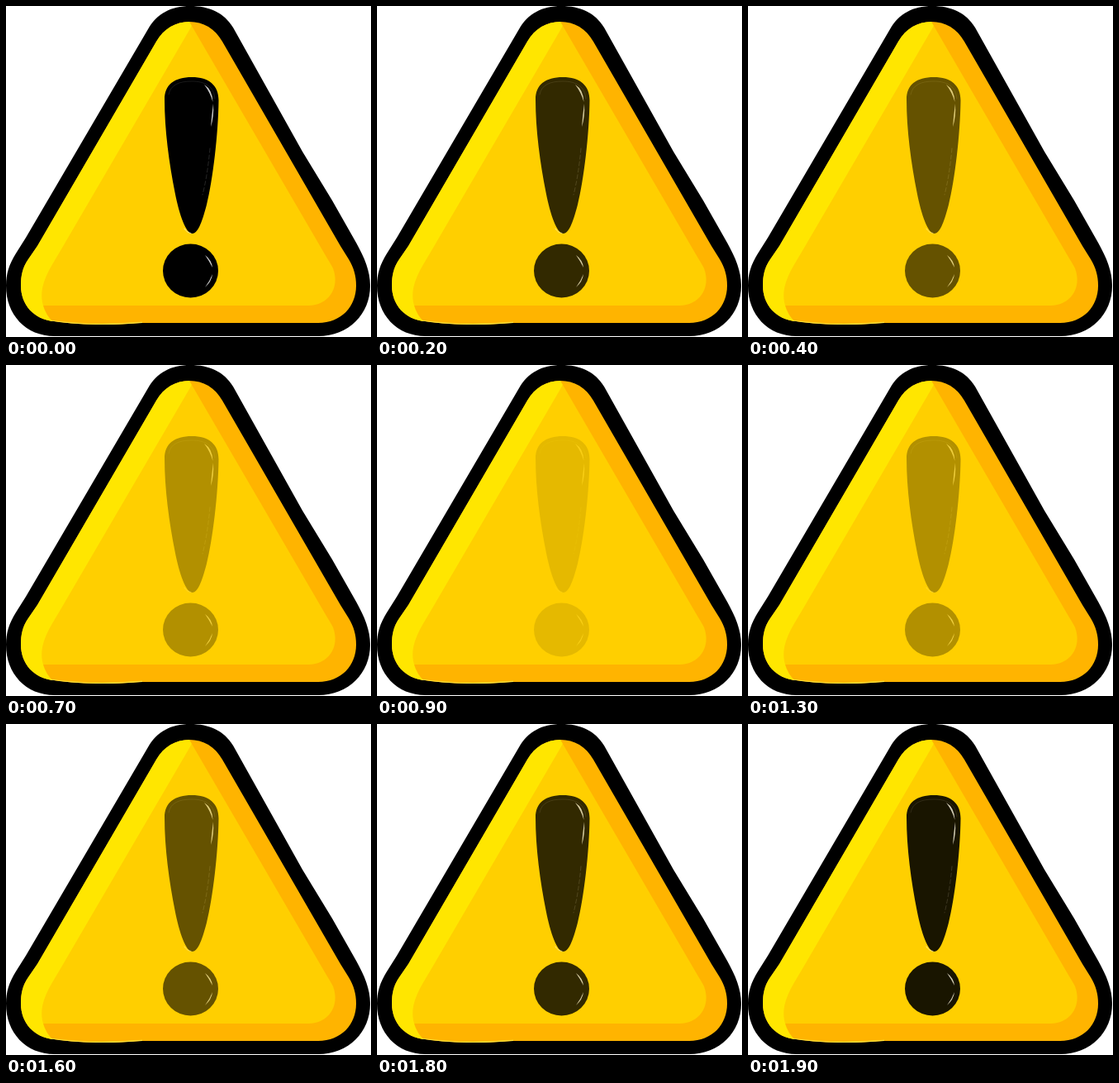
An HTML page without scripts for the animation above (2 s loop, 442 px wide and 400 px high).

```html
<!DOCTYPE html>
<html lang="en">
<head>
<meta charset="utf-8">
<title>Warning sign</title>
<style>
  html, body { margin: 0; width: 100%; height: 100%; overflow: hidden; background: #fff; }
  svg { display: block; width: 100vw; height: 100vh; }
  .mark { animation: fade 2s infinite; }
  /* ten hard steps down, ten back up */
  @keyframes fade {
    0%   { opacity: 1; animation-timing-function: steps(10, end); }
    50%  { opacity: 0; animation-timing-function: steps(10, end); }
    100% { opacity: 1; }
  }
  .glint { fill: #fff; opacity: .8; }
  .rim { fill: none; stroke: #fff; stroke-linecap: round; }
</style>
</head>
<body>
<svg viewBox="0 0 442 400">
  <defs>
    <clipPath id="face">
      <path d="M182 43C191 27 206 19 222 19C239 19 253 27 262 43L405 290L415 306
               C421 316 424 326 424 338C424 363 406 383 378 383L165 383
               C130 386 90 386 58 381C34 379 18 361 18 338C18 326 20 316 27 306L38 290Z"/>
    </clipPath>
  </defs>

  <path d="M172 28C183 9 200 0 223 0C246 0 264 8 275 26L359 176L395 235L424 286
           C434 304 441 320 441 338C441 372 415 399 378 399L59 399
           C24 399 0 373 0 338C0 323 4 312 12 299L24 280Z"/>

  <g clip-path="url(#face)">
    <path fill="#ffb400" d="M0 0H442V400H0Z"/>
    <path fill="#ffe600" d="M222 0V19L225 24L100 300L45 362Q48 373 57 382L0 400V0Z"/>
    <path fill="#ffcf00" d="M222 19L225 24L64 299C50 322 39 340 45 362L366 362
                            C390 362 405 341 396 317Q394 313 389 305Z"/>
    <path fill="none" stroke="#ffe23c" stroke-width="1.5" d="M54 380.500C90 385.500 130 385.500 165 382.500"/>
  </g>

  <g class="mark">
    <path d="M192 113C192 95 204 86 225 86C246 86 257.500 96 257.500 114
             C257 155 250.500 210 243 240C237 263 232 275 225.500 275
             C218 275 210 253 204.500 225C197.500 190 192 150 192 113Z"/>
    <ellipse cx="223.500" cy="320" rx="33.500" ry="32.500"/>
    <path class="rim" stroke-width="1" opacity=".1" d="M197 107C199 95 210 91 225 91C241 91 252 97 253 112"/>
    <path class="rim" stroke-width="1" opacity=".15" stroke-dasharray="5 3" d="M247 172Q244 205 238 228"/>
    <path class="rim" stroke-width="1" opacity=".6" d="M216 269Q219 274 224 274.500"/>
    <path class="glint" d="M240 95Q250 101 250.500 116Q247 104 240 95Z"/>
    <path class="glint" d="M251 118Q252 134 248 146Q249 132 251 118Z"/>
    <path class="glint" d="M241 301Q249 307 250 316Q246 308 241 301Z"/>
    <path class="glint" d="M250 324Q249 333 241 340Q247 332 250 324Z"/>
  </g>
</svg>
</body>
</html>
```
